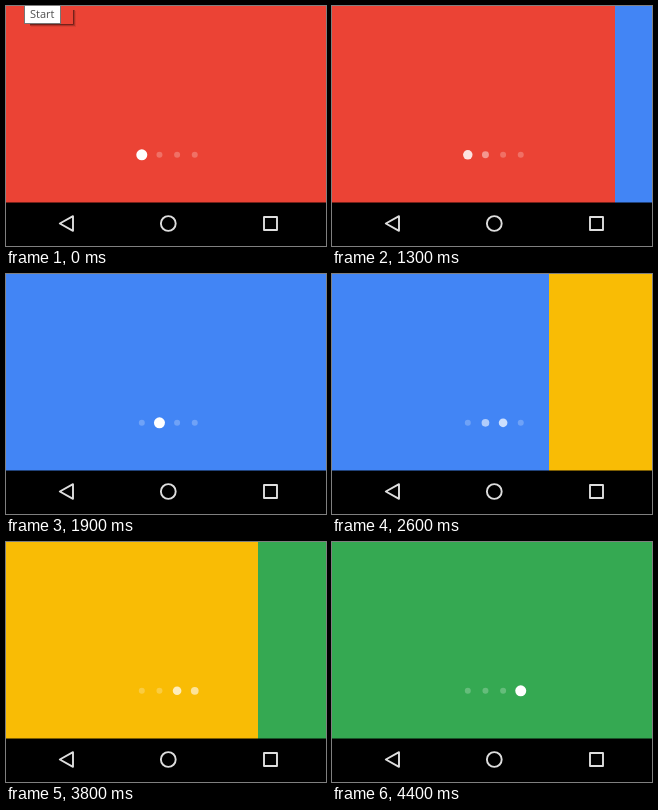
Recreate the animation shown at these times as an HTML page. Size 320 by 240 pixels, loop 5100 ms.

```html
<!DOCTYPE html>
<html lang="en">
<head>
<meta charset="utf-8">
<title>Pager swipe</title>
<style>
  html, body { margin: 0; width: 100%; height: 100%; overflow: hidden; background: #000; }
  svg { display: block; width: 100vw; height: 100vh; }
  text { font: 11px "Open Sans", "Noto Sans", sans-serif; fill: #505050; }
</style>
</head>
<body>
<svg viewBox="0 0 320 240">
  <rect id="current" width="320" height="197"/>
  <rect id="next" width="320" height="197"/>
  <g id="dots" fill="#fff"></g>
  <g id="tooltip">
    <g fill="none" stroke="#000">
      <path d="M24 18.5H67.5V4" stroke-opacity=".5"/>
      <path d="M24 19.5H68.5V4" stroke-opacity=".25"/>
      <path d="M25 20.5H69.5V5" stroke-opacity=".08"/>
    </g>
    <rect id="label-box" x="18.5" y="-2.5" height="20" fill="#fff" stroke="#767676"/>
    <text id="label" x="24" y="12"></text>
  </g>
  <rect y="196.5" width="320" height="43.5"/>
  <g fill="none" stroke="#dedede" stroke-width="1.9" stroke-linejoin="round">
    <path d="M53.8 217.5L67 210.2V224.8Z"/>
    <circle cx="162.3" cy="217.5" r="7.4"/>
    <rect x="258" y="211" width="13" height="13"/>
  </g>
</svg>
<script>
const LOOP = 5100, STEP = 100, WIDTH = 320, FLING = 455;
const COLORS = ["#eb4335", "#4285f5", "#f9bc05", "#35a952"];
const SWIPES = [
  { press: 1000, drag: 1000, release: 1370, edge: 264, settled: 1900 },
  { press: 2400, drag: 2400, release: 2600, edge: 217, settled: 3200 },
  { press: 3600, drag: 3700, release: 3800, edge: 252, settled: 4400 }
];

const $ = id => document.getElementById(id);
const clamp = v => Math.max(0, Math.min(1, v));
const mix = (a, b, k) => a + (b - a) * k;

function setAttrs(el, attrs) {
  for (const name in attrs) el.setAttribute(name, attrs[name]);
}

const dots = COLORS.map((_, i) => {
  const dot = document.createElementNS("http://www.w3.org/2000/svg", "circle");
  setAttrs(dot, { cx: 135.8 + i * 17.65, cy: 148.8 });
  return $("dots").appendChild(dot);
});

// Left edge of the incoming page: an accelerating drag, then a quintic fling.
function pageEdge(swipe, t) {
  if (t < swipe.release) {
    const pull = clamp((t - swipe.drag) / (swipe.release - swipe.drag));
    return Math.round(mix(WIDTH, swipe.edge, pull ** 2));
  }
  return Math.round(swipe.edge * (1 - clamp((t - swipe.release) / FLING)) ** 5);
}

function drawTooltip(t) {
  const wide = t >= 100;
  $("label").textContent = wide ? "Record" : "Start";
  setAttrs($("label-box"), { width: wide ? 48 : 36 });
  setAttrs($("tooltip"), { opacity: t < 300 ? 1 : clamp((600 - t) / 400) });
}

function draw(t) {
  const page = SWIPES.filter(s => t >= s.settled).length;
  const swipe = SWIPES[page];
  const edge = swipe ? pageEdge(swipe, t) : WIDTH;
  const pressed = swipe && t >= swipe.press;

  setAttrs($("current"), { fill: COLORS[page] });
  setAttrs($("next"), { x: edge, fill: COLORS[page + 1] || COLORS[page] });

  // The indicator changes over halfway through the page's travel.
  const handover = clamp((1 - edge / WIDTH) / 0.53);
  dots.forEach((dot, i) => {
    const active = i === page ? 1 - handover : i === page + 1 ? handover : 0;
    const radius = i === page && !pressed ? 5.5 : mix(3, 5.2, active);
    setAttrs(dot, { r: radius, "fill-opacity": mix(0.24, 1, active ** 0.85) });
  });

  drawTooltip(t);
}

const start = performance.now();
function tick() {
  const t = (performance.now() - start) % LOOP;
  draw(Math.floor(t / STEP) * STEP);
  requestAnimationFrame(tick);
}
tick();
</script>
</body>
</html>
```
